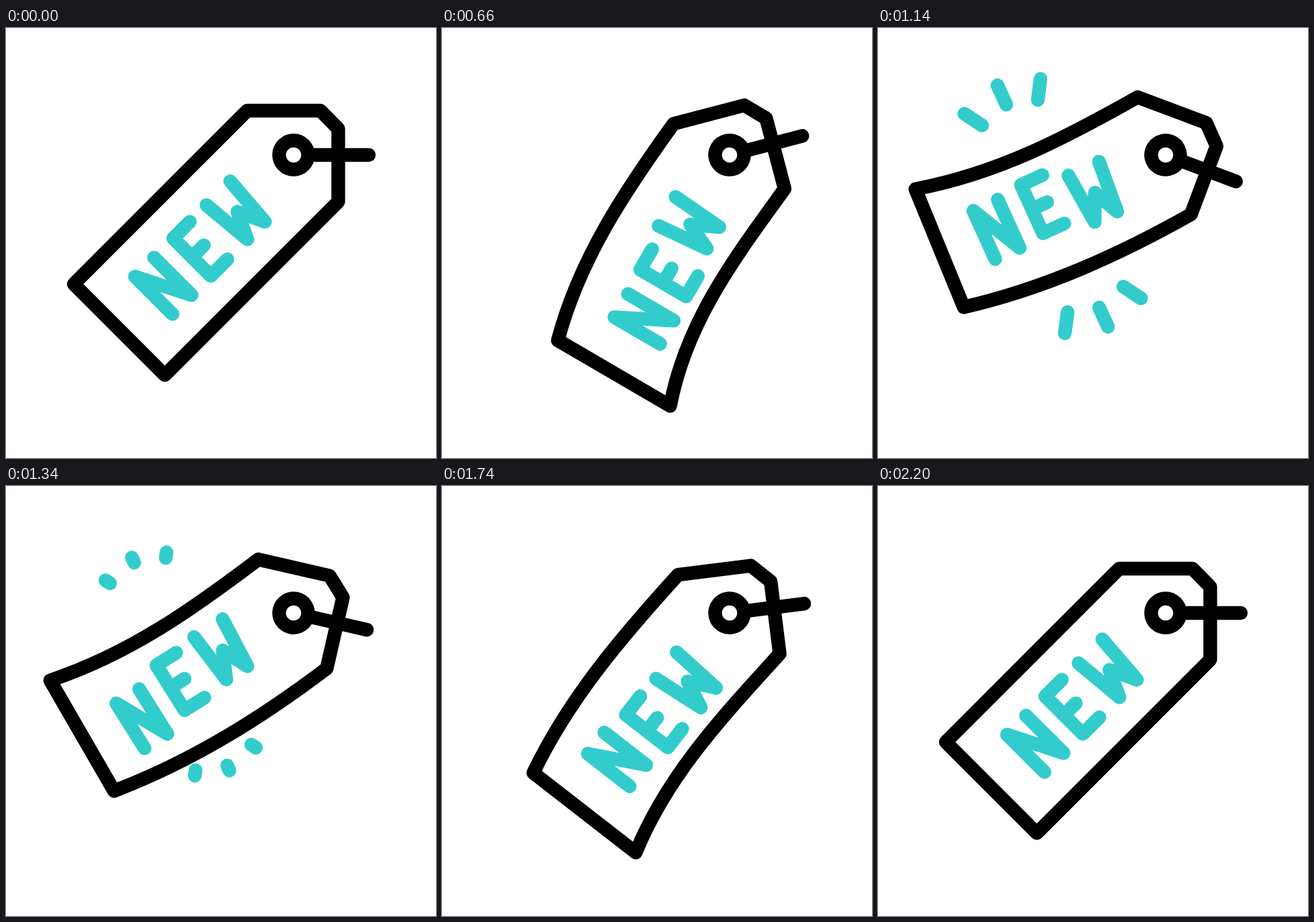
Animation, 640 px wide and 640 px high, one loop 2400 ms. Source, as an HTML page with a canvas:

```html
<!DOCTYPE html>
<html lang="en">
<head>
<meta charset="utf-8">
<title>New tag</title>
<style>
  html, body { margin: 0; width: 100%; height: 100%; overflow: hidden; background: #fff; }
  canvas { display: block; width: 640px; height: 640px; }
</style>
</head>
<body>
<canvas id="stage" width="640" height="640"></canvas>
<script>
const ctx = document.getElementById('stage').getContext('2d');
const LOOP = 2400;
const TEAL = '#33cccc';
const RAD = Math.PI / 180;
const HOLE = { x: 428, y: 189 };

const smooth = p => p * p * (3 - 2 * p);

// eased path through [time, value] poses
function pose(t, ...keys) {
  const i = keys.findIndex(([time]) => t < time);
  if (i < 0) return keys[keys.length - 1][1];
  if (i === 0) return keys[0][1];
  const [t0, a] = keys[i - 1], [t1, b] = keys[i];
  return a + (b - a) * smooth((t - t0) / (t1 - t0));
}

const swing = t => pose(t, [205, 0], [700, -15], [1200, 22], [1600, -10], [2000, 0]);
const bend = t => pose(t, [205, 0], [700, 1], [820, 1.05], [1220, -1.1], [1780, 0.8], [2140, 0]);
const bounce = t => pose(t, [200, 0], [600, 14], [1000, -11], [1400, 14], [1800, 0]);
const burst = t => smooth(Math.max(0, 1 - Math.abs(t - 1200) / 200));

// runs a drawing step in a moved and turned frame
function within(x, y, angle, step) {
  ctx.save();
  ctx.translate(x, y);
  ctx.rotate(angle * RAD);
  step();
  ctx.restore();
}

function line(...points) {
  ctx.beginPath();
  for (const [x, y] of points) ctx.lineTo(x, y);
  ctx.stroke();
}

// shift a point along the tag (u, towards the tail) and across it (v)
function shift([x, y], u, v) {
  return [x + (v - u) * Math.SQRT1_2, y + (v + u) * Math.SQRT1_2];
}

// Positions are relative to the hole
function drawTag(b) {
  const left = [-69, -66], right = [66.5, 69.5];
  const length = 365, third = length / 3;
  const squeeze = 8 * Math.min(b, 0);
  const near = -12 * b, far = -20 * b;
  const farRight = far - 8 * Math.abs(b);
  const tailL = shift(left, length + squeeze, 14 * b);
  const tailR = shift(right, length, 16 * b);

  ctx.beginPath();
  ctx.moveTo(...left);
  ctx.lineTo(40, -66);
  ctx.lineTo(66.5, -39);
  ctx.lineTo(...right);
  ctx.bezierCurveTo(...shift(right, third, near), ...shift(right, 2 * third, farRight), ...tailR);
  ctx.lineTo(...tailL);
  ctx.bezierCurveTo(...shift(left, 2 * third + squeeze, far), ...shift(left, third, near), ...left);
  ctx.closePath();
  ctx.stroke();

  line([22, 0], [112, 0]);
  ctx.beginPath();
  ctx.arc(0, 0, 21.5, 0, 2 * Math.PI);
  ctx.fill();
  ctx.stroke();
}

function drawN() {
  line([0, 79], [0, 0], [40, 79], [40, 0]);
}

function drawE() {
  line([35, 0], [0, 0], [0, 79], [35, 79]);
  line([0, 39.5], [25, 39.5]);
}

function drawW() {
  line([0, 0], [7, 79], [25.5, 39.5], [44, 79], [50, 0]);
}

// letters bounce one after another across the tag
function drawWord(t) {
  within(192 - HOLE.x, 370 - HOLE.y, -45, () => {
    within(0, bounce(t), 0, drawN);
    within(80.5, bounce(t - 200), 0, drawE);
    within(150.5, bounce(t - 400), 0, drawW);
  });
}

// two opposite fans of three rays
function drawRays(reach) {
  if (reach <= 0) return;
  for (const side of [0, 180]) {
    for (const i of [-1, 0, 1]) {
      within(260, 265, side - 114.6 + 16.6 * i, () => {
        within(166 - 6.5 * i * i, 0, 15.5 * i, () => line([0, 0], [40 * reach, 0]));
      });
    }
  }
}

function draw(t) {
  ctx.fillStyle = '#fff';
  ctx.fillRect(0, 0, 640, 640);
  ctx.lineWidth = 20.4;
  ctx.lineCap = ctx.lineJoin = 'round';
  within(HOLE.x, HOLE.y, swing(t), () => {
    ctx.strokeStyle = '#000';
    drawTag(bend(t));
    ctx.strokeStyle = TEAL;
    drawWord(t);
  });
  ctx.strokeStyle = TEAL;
  drawRays(burst(t));
}

const start = performance.now();
function frame() {
  draw((performance.now() - start) % LOOP);
  requestAnimationFrame(frame);
}
draw(0);
requestAnimationFrame(frame);
</script>
</body>
</html>
```
